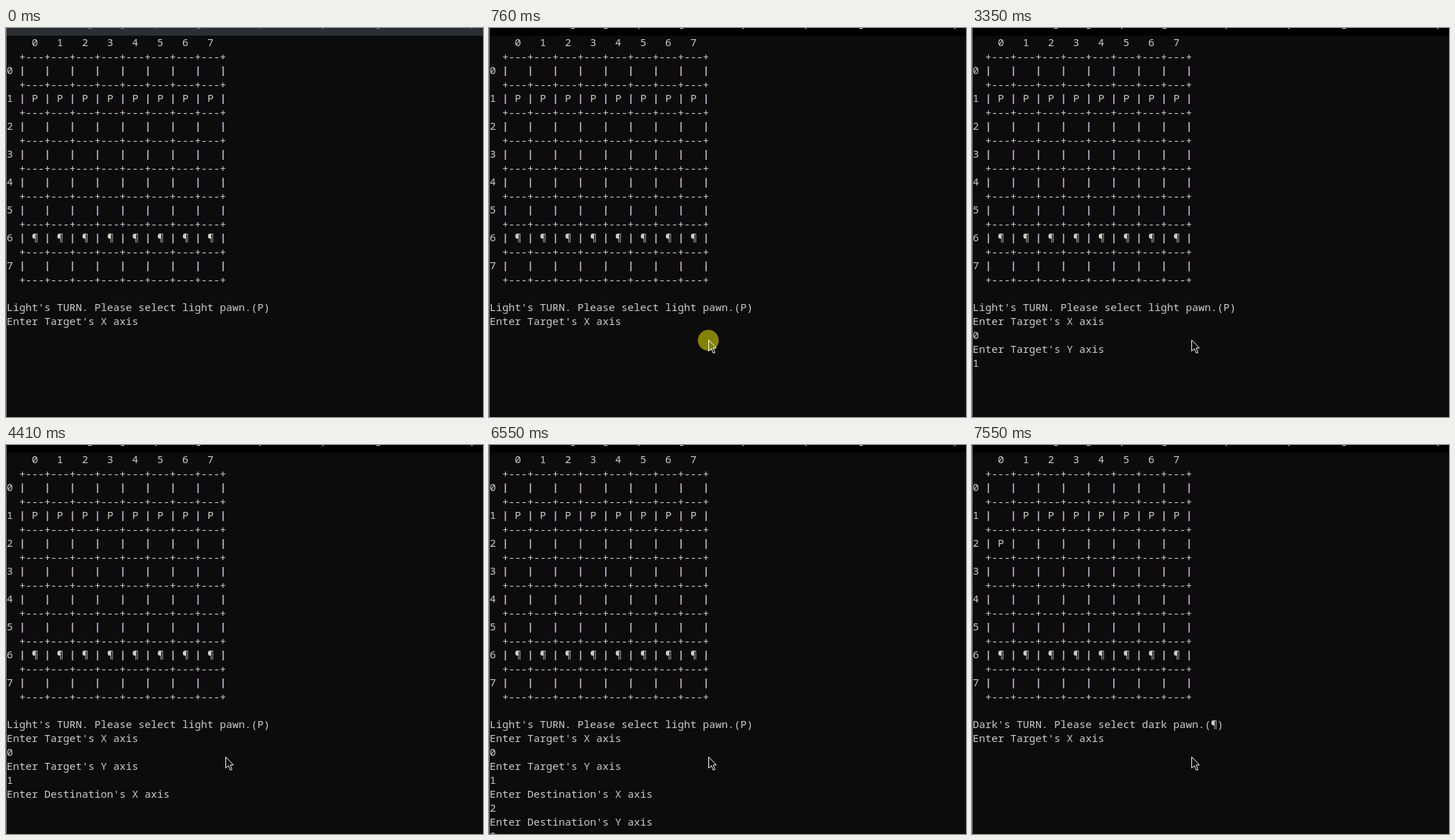
These frames come from a looping animation (685 by 558 pixels, 8 s). An HTML page:

```html
<!DOCTYPE html>
<html lang="en">
<head>
<meta charset="utf-8">
<title>Pawn game console</title>
<style>
html, body { margin: 0; width: 100%; height: 100%; overflow: hidden; background: #0c0c0c; }
#stage { position: relative; width: 685px; height: 558px; overflow: hidden; background: #0c0c0c; }
#stage > * { position: absolute; }
#bar { left: 0; top: 0; width: 685px; height: 11px; }
#bar i { position: absolute; top: 0; height: 1px; background: currentColor; }
#edge { left: 0; top: 0; width: 1px; height: 558px; background: #777; }
pre { left: 1px; top: 10px; margin: 0; color: #ccc; font: 15px/20px "Noto Sans Mono", "DejaVu Sans Mono", monospace; font-variant-ligatures: none; }
pre b { font-weight: 600; color: #cbb4d2; }
pre s { position: relative; top: 1px; text-decoration: none; }
#caret { width: 9px; height: 5px; background: #fff; }
svg { left: 0; top: 0; }
</style>
</head>
<body>
<div id="stage">
  <div id="bar"></div>
  <div id="edge"></div>
  <pre id="text"></pre>
  <div id="caret"></div>
  <svg width="685" height="558">
    <circle id="halo" cx="315" cy="448" r="15" fill="#838303"/>
    <path id="mouse" d="M.5.5V16.5L4.3 13L6.8 19H9.2V17.5L7 12H11.5Z" fill="none" stroke="#fff"/>
  </svg>
</div>
<script>
const $ = id => document.getElementById(id);
const LOOP = 8000, CLICK = 610, CLEAR = 6880, REDRAW = 6950;

const typed = [
  [2750, "0"], [3150, "\nEnter Target's Y axis\n"],
  [3350, "1"], [3610, "\nEnter Destination's X axis\n"],
  [5410, "2"], [5810, "\nEnter Destination's Y axis\n"],
  [6550, "0"]
];
const caretOn = [[1230, 1760], [2270, 2820], [3150, 3350], [3610, 4410], [4940, 5480], [6950, 7550]];
const path = [[200, 481, 520], [270, 390, 487], [340, 325, 458], [540, 318, 450], [CLICK, 315, 447]];

// Descenders of the cropped window title: x, width
const tails = [[118, 5], [165, 5], [214, 2], [274, 5], [364, 2], [454, 2], [532, 5], [668, 2]];
$("bar").innerHTML = tails.map(([x, w]) => `<i style="left:${x}px;width:${w}px"></i>`).join("");

function board(moved) {
  const rule = "  " + "+---".repeat(8) + "+\n";
  let out = "    " + [..."01234567"].join("   ") + "\n" + rule;
  for (let y = 0; y < 8; y++) {
    out += y + " ";
    for (let x = 0; x < 8; x++) {
      const light = y === (moved && x === 0 ? 2 : 1);
      out += `| ${light ? "P" : y === 6 ? "¶" : " "} `;
    }
    out += "|\n" + rule;
  }
  return out + "\n";
}

function screen(t) {
  if (t >= CLEAR && t < REDRAW) return "";
  const dark = t >= REDRAW;
  const turn = dark ? "Dark's TURN. Please select dark pawn.(¶)" : "Light's TURN. Please select light pawn.(P)";
  const input = dark ? "" : typed.filter(s => t >= s[0]).map(s => s[1]).join("");
  return board(dark) + turn + "\nEnter Target's X axis\n" + input;
}

let shown = null;
function draw(now) {
  const t = now % LOOP;
  const text = screen(t);
  if (text !== shown) {
    shown = text;
    $("text").innerHTML = text.replace(/\|/g, "<b>|</b>").replace(/\+[-+]+/g, "<s>$&</s>");
    const lines = text.split("\n");
    $("caret").style.left = 1 + 9 * lines[lines.length - 1].length + "px";
    $("caret").style.top = 26 + 20 * (lines.length - 1) + "px";
  }
  $("caret").hidden = !caretOn.some(([a, b]) => t >= a && t < b);

  const focused = t >= CLICK;
  $("bar").style.background = focused ? "#000" : "#2b2f31";
  $("bar").style.color = focused ? "#ddd" : "#6f8b9c";
  $("halo").style.display = focused && t < 830 ? "" : "none";

  const at = path.filter(p => t >= p[0]).pop();
  $("mouse").style.display = at ? "" : "none";
  if (at) $("mouse").setAttribute("transform", `translate(${at[1]} ${at[2]})`);
  requestAnimationFrame(draw);
}
draw(performance.now());
</script>
</body>
</html>
```
